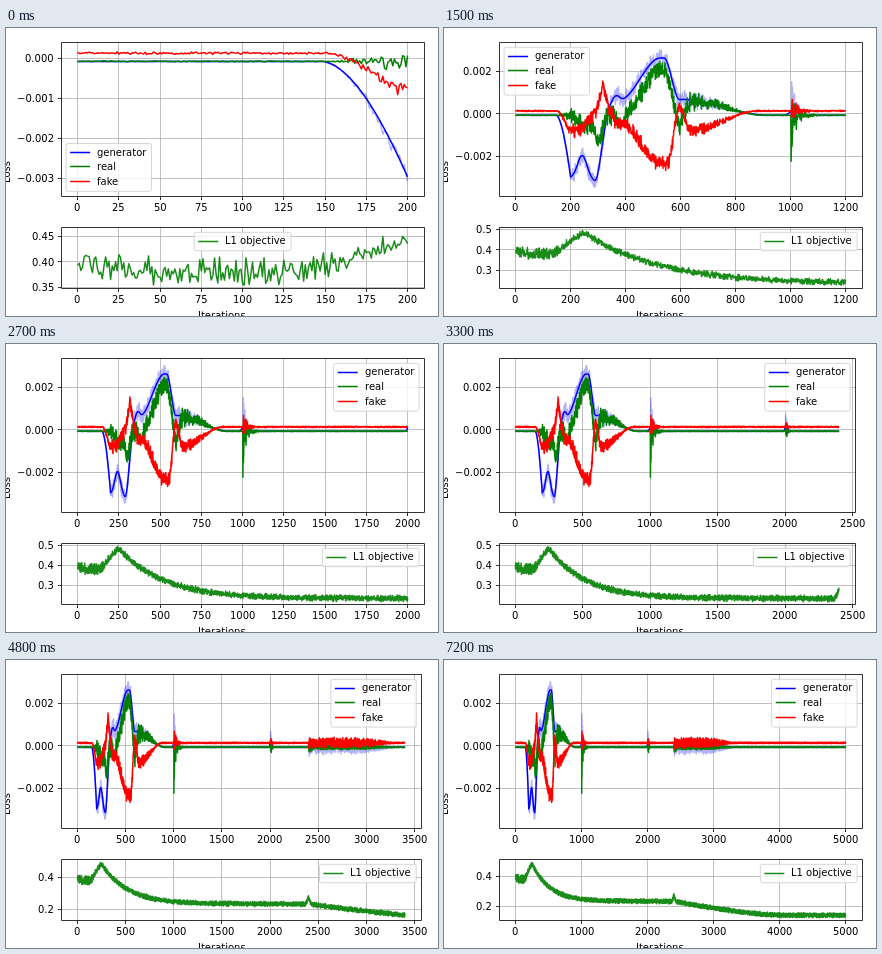
An HTML page with a canvas for the animation above (7500 ms loop, 432 by 288 pixels).

```html
<!DOCTYPE html>
<html lang="en">
<head>
<meta charset="utf-8">
<title>Training curves</title>
<style>
  html, body { margin: 0; width: 100%; height: 100%; overflow: hidden; background: #fff; }
  canvas { display: block; }
</style>
</head>
<body>
<canvas id="stage" width="432" height="288"></canvas>
<script>
const ctx = document.getElementById('stage').getContext('2d');
const FONT = '10px "DejaVu Sans", sans-serif';
const STEP_MS = 300, STEPS = 25, PER_STEP = 200, LAST = STEPS * PER_STEP;
const LEFT = 55.1, RIGHT = 418.1, PAGE_RIGHT = 421.2;
const REACH = .88; // share of the noise bound that samples usually fill

// Building blocks for the curves.
const lin = (x, a, b) => Math.min(1, Math.max(0, (x - a) / (b - a)));
const ramp = (x, a, b) => { const t = lin(x, a, b); return t * t * (3 - 2 * t); };
const span = (x, a, b, c, d) => ramp(x, a, b) - ramp(x, c, d);
const bump = (x, center, width) => Math.exp(-(((x - center) / width) ** 2));
const decay = (x, from, width) => x < from ? 0 : Math.exp((from - x) / width);

// Losses are in thousandths.
const genMean = x => -.07
  - 2.95 * (lin(x, 148, 200) ** 1.75 - ramp(x, 288, 340))
  + 1.05 * bump(x, 242, 24) - .15 * bump(x, 290, 20)
  + .75 * span(x, 320, 360, 600, 920) + .18 * bump(x, 368, 14)
  + 1.95 * span(x, 380, 525, 540, 596)
  + .3 * bump(x, 1012, 18) + .35 * bump(x, 2010, 12);

const realMean = x => -.065
  - .45 * bump(x, 255, 35) - 1.2 * bump(x, 303, 17) - .4 * bump(x, 385, 18)
  + 2.15 * span(x, 385, 530, 540, 592) - .6 * bump(x, 594, 9)
  + .65 * span(x, 595, 640, 660, 900) - .9 * decay(x, 1002, 8);

const fakeMean = x => .14
  - .92 * span(x, 150, 203, 230, 300) + 1.2 * bump(x, 318, 14)
  - .6 * span(x, 335, 375, 555, 592) - 1.85 * span(x, 385, 525, 555, 592)
  + .25 * bump(x, 597, 8) - .9 * span(x, 600, 634, 640, 880);

const l1Mean = x => .382 + .015 * decay(x, 0, 20) + .099 * ramp(x, 125, 255)
  - .247 * (1 - Math.exp(-Math.max(0, x - 255) / 270))
  - .093 * (1 - (1 - lin(x, 2400, 4000)) ** 1.4) + .04 * bump(x, 2400, 18);
const l1Noise = x => .018 + .014 * (1 - ramp(x, 120, 240));

// Unrest early on, three sudden kicks, and a restless stretch after the last one.
const lossNoise = (quiet, early, kick, late) => x => quiet
  + early * span(x, 150, 225, 620, 860)
  + kick * (decay(x, 1002, 22) + .4 * decay(x, 2005, 10) + .35 * decay(x, 2402, 12))
  + late * span(x, 2400, 2420, 2900, 3330);

function random(seed) {
  return () => {
    seed = (seed + 0x6D2B79F5) | 0;
    let t = Math.imul(seed ^ (seed >>> 15), 1 | seed);
    t = (t + Math.imul(t ^ (t >>> 7), 61 | t)) ^ t;
    return ((t ^ (t >>> 14)) >>> 0) / 4294967296;
  };
}

function series(mean, noise, seed, scale) {
  const rnd = random(seed);
  const sample = f => Array.from({ length: LAST + 1 }, (_, i) => scale * f(i));
  return {
    data: sample(i => mean(i) + noise(i) * (rnd() + rnd() - 1)),
    low: sample(i => mean(i) - REACH * noise(i)),
    high: sample(i => mean(i) + REACH * noise(i)),
  };
}

const gen = series(genMean, () => 0, 1, .001);
const raw = series(genMean, lossNoise(.02, .45, 1.6, .35), 11, .001);
const real = series(realMean, lossNoise(.015, .5, 1.7, .12), 23, .001);
const fake = series(fakeMean, lossNoise(.035, .35, .9, .25), 37, .001);
const l1 = series(l1Mean, l1Noise, 53, 1);

const L1_COLOR = 'rgba(0,128,0,0.9)';
const lossLines = [[raw, 'rgba(0,0,255,0.3)'], [gen, 'blue'], [real, 'green'], [fake, 'red']];
const l1Lines = [[l1, L1_COLOR]];
const lossRows = [['generator', 'blue'], ['real', 'green'], ['fake', 'red']];
const l1Rows = [['L1 objective', L1_COLOR]];

const snap = v => Math.floor(v) + .5;
const padded = (lo, hi) => [lo - (hi - lo) * .05, hi + (hi - lo) * .05];

function valueRange(lines, n) {
  const lows = lines.map(([s]) => Math.min(...s.low.slice(0, n + 1)));
  const highs = lines.map(([s]) => Math.max(...s.high.slice(0, n + 1)));
  return padded(Math.min(...lows), Math.max(...highs));
}

function ticks([lo, hi], bins) {
  const rough = (hi - lo) / bins, mag = 10 ** Math.floor(Math.log10(rough));
  const nice = [1, 2, 2.5, 5, 10];
  let k = nice.findIndex(s => s * mag >= rough), step, list;
  do {
    step = nice[k] * mag;
    list = [];
    for (let i = Math.ceil(lo / step); i * step <= hi; i++) list.push(i * step);
  } while (list.length < 2 && k-- > 0);
  const digits = Math.max(0, Math.ceil(-Math.log10(step) - 1e-9));
  return list.map(value => ({ value, text: value.toFixed(digits).replace('-', '\u2212') }));
}

function line(x1, y1, x2, y2, color, width) {
  ctx.strokeStyle = color;
  ctx.lineWidth = width;
  ctx.beginPath();
  ctx.moveTo(x1, y1);
  ctx.lineTo(x2, y2);
  ctx.stroke();
}

// Text starts on whole pixels; align is the share of its width left of x.
function text(str, x, y, align) {
  ctx.fillStyle = '#000';
  ctx.fillText(str, Math.round(x - align * ctx.measureText(str).width), Math.round(y));
}

function legend(box, place, rows) {
  const w = 36 + Math.max(...rows.map(r => ctx.measureText(r[0]).width));
  const h = 3.7 + 14.7 * rows.length;
  const x = place.includes('left') ? box.left + 5
    : place.includes('center') ? (box.left + box.right - w) / 2 : box.right - 5 - w;
  const y = place.includes('lower') ? box.bottom - 5 - h : box.top + 5;
  ctx.beginPath();
  ctx.roundRect(x, y, w, h, 2);
  ctx.fillStyle = 'rgba(255,255,255,0.8)';
  ctx.fill();
  ctx.strokeStyle = 'rgba(204,204,204,0.8)';
  ctx.lineWidth = 1;
  ctx.stroke();
  rows.forEach(([label, color], i) => {
    const cy = y + 8.7 + 14.7 * i;
    line(x + 4, snap(cy), x + 24, snap(cy), color, 1.5);
    text(label, x + 31, cy + 3.4, 0);
  });
}

function plot(box, n, xTicks, yBins, lines) {
  const { left, right, top, bottom } = box;
  const [lo, hi] = valueRange(lines, n);
  const px = v => left + (right - left) * (v / n + .05) / 1.1;
  const py = v => bottom - (bottom - top) * (v - lo) / (hi - lo);
  const L = snap(left), R = snap(right), T = snap(top), B = snap(bottom);

  for (const t of xTicks) {
    const x = snap(px(t.value));
    line(x, T, x, B, '#b0b0b0', .8);
    line(x, B, x, B + 3.5, '#000', .8);
    text(t.text, px(t.value), bottom + 14.8, .5);
  }
  for (const t of ticks([lo, hi], yBins)) {
    const y = snap(py(t.value));
    line(L, y, R, y, '#b0b0b0', .8);
    line(L - 3.5, y, L, y, '#000', .8);
    text(t.text, left - 7, py(t.value) + 3.8, 1);
  }

  ctx.save();
  ctx.beginPath();
  ctx.rect(left, top, right - left, bottom - top);
  ctx.clip();
  ctx.lineWidth = 1.5;
  for (const [{ data }, color] of lines) {
    ctx.strokeStyle = color;
    ctx.beginPath();
    for (let i = 0; i <= n; i++) ctx.lineTo(px(i), py(data[i]));
    ctx.stroke();
  }
  ctx.restore();

  ctx.strokeStyle = '#000';
  ctx.lineWidth = .8;
  ctx.strokeRect(L, T, R - L, B - T);
}

// Legends go where the curves leave room.
function lossPlace(n) {
  if (n <= 400) return 'lower left';
  return [600, 800, 1200].includes(n) ? 'upper left' : 'upper right';
}

function l1Place(n) {
  return n === 200 ? 'upper center' : n === 400 ? 'upper left' : 'upper right';
}

function draw(n) {
  ctx.fillStyle = '#fff';
  ctx.fillRect(0, 0, 432, 288);
  ctx.font = FONT;
  ctx.lineJoin = 'round';

  // The plots narrow when the last tick label would run off the page.
  const xTicks = ticks(padded(0, n), 9), end = xTicks[xTicks.length - 1];
  const half = ctx.measureText(end.text).width / 2;
  const right = Math.min(RIGHT, LEFT + (PAGE_RIGHT - half - LEFT) * 1.1 / (end.value / n + .05));

  const upper = { left: LEFT, right, top: 14.3, bottom: 168.3 };
  const lower = { left: LEFT, right, top: 199.3, bottom: 260.4 };
  plot(upper, n, xTicks, 7, lossLines);
  legend(upper, lossPlace(n), lossRows);
  plot(lower, n, xTicks, 3, l1Lines);
  legend(lower, l1Place(n), l1Rows);

  text('Iterations', 216, 291, .5);
  ctx.save();
  ctx.translate(4, 144);
  ctx.rotate(-Math.PI / 2);
  text('Loss', 0, 0, .5);
  ctx.restore();
}

const start = performance.now();
let shown = -1;
function tick() {
  const step = Math.floor((performance.now() - start) / STEP_MS) % STEPS;
  if (step !== shown) draw((step + 1) * PER_STEP);
  shown = step;
  requestAnimationFrame(tick);
}
tick();
</script>
</body>
</html>
```
